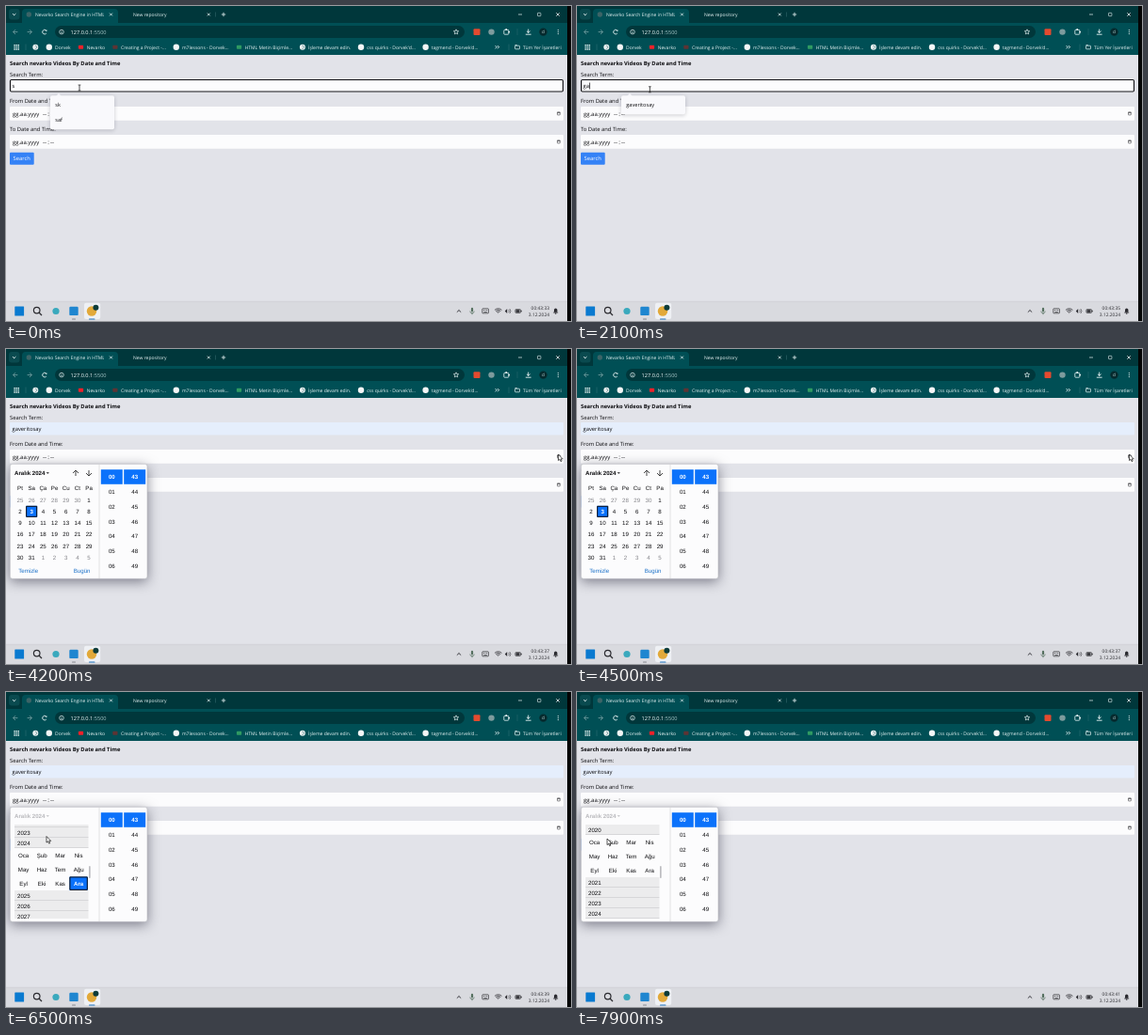
Recreate the animation shown at these times as an HTML page with a canvas. Size 600 by 335 pixels, loop 8000 ms.

```html
<!DOCTYPE html>
<html lang="tr">
<head>
<meta charset="utf-8">
<title>Search Videos</title>
<style>
html, body { margin: 0; width: 100%; height: 100%; overflow: hidden; background: #000; }
canvas { display: block; width: 600px; height: 335px; }
</style>
</head>
<body>
<canvas id="stage" width="600" height="335"></canvas>
<script>
const ctx = document.getElementById('stage').getContext('2d');
const UI = '"Open Sans", "Noto Sans", sans-serif';
const ARIAL = '"Liberation Sans", Arial, sans-serif';
const LOOP = 8000;
const TERM = 'gaveritosay';
const BLUE = '#0b72fb', INK = '#0c0c0f', PALE = '#e9f4f4', DIM = '#6f9a9d';
const STRIP = '#00373b', BAR = '#004f55', PAGE = '#e2e3e9', SHEET = '#fcfcfd';

const ramp = (t, a, b) => Math.min(1, Math.max(0, (t - a) / (b - a)));
const mix = (a, b, p) => a + (b - a) * p;
const glide = (t, a, b) => {
  const p = ramp(t, a, b);
  return p * p * (3 - 2 * p);
};

// ---- drawing helpers ----

function box(x, y, w, h, fill, r = 0) {
  ctx.fillStyle = fill;
  ctx.beginPath();
  ctx.roundRect(x, y, w, h, r);
  ctx.fill();
}

function frame(x, y, w, h, color, width = 1, r = 0) {
  ctx.strokeStyle = color;
  ctx.lineWidth = width;
  ctx.beginPath();
  ctx.roundRect(x, y, w, h, r);
  ctx.stroke();
}

function dot(x, y, r, fill) {
  ctx.fillStyle = fill;
  ctx.beginPath();
  ctx.arc(x, y, r, 0, 7);
  ctx.fill();
}

// An arc that spans the given angle, centred on a heading
function arc(x, y, r, color, width = 0.8, span = 2 * Math.PI, heading = 0) {
  ctx.strokeStyle = color;
  ctx.lineWidth = width;
  ctx.beginPath();
  ctx.arc(x, y, r, heading - span / 2, heading + span / 2);
  ctx.stroke();
}

function line(x0, y0, x1, y1, color, width = 0.8) {
  ctx.strokeStyle = color;
  ctx.lineWidth = width;
  ctx.beginPath();
  ctx.moveTo(x0, y0);
  ctx.lineTo(x1, y1);
  ctx.stroke();
}

// Runs a drawing around (x, y), turned clockwise by quarter turns
function turned(x, y, quarters, draw) {
  ctx.save();
  ctx.translate(x, y);
  ctx.rotate(quarters * Math.PI / 2);
  draw();
  ctx.restore();
}

const UP = 0, RIGHT = 1, DOWN = 2, LEFT = 3;

function chevron(x, y, r, dir, color, width = 0.9) {
  turned(x, y, dir, () => {
    line(-r, r / 2, 0.2, -r / 2, color, width);
    line(r, r / 2, -0.2, -r / 2, color, width);
  });
}

function arrow(x, y, r, dir, color) {
  turned(x, y, dir, () => line(0, r, 0, -r, color, 0.9));
  turned(x, y, dir, () => {
    line(-r, 0, 0, -r, color, 0.9);
    line(r, 0, 0, -r, color, 0.9);
  });
}

function triangle(x, y, r, dir, color) {
  turned(x, y, dir, () => {
    ctx.fillStyle = color;
    ctx.beginPath();
    ctx.moveTo(-r, r / 2);
    ctx.lineTo(r, r / 2);
    ctx.lineTo(0, -r / 2);
    ctx.fill();
  });
}

function cross(x, y, r, color) {
  line(x - r, y - r, x + r, y + r, color);
  line(x - r, y + r, x + r, y - r, color);
}

function star(x, y, r, color) {
  ctx.strokeStyle = color;
  ctx.lineWidth = 0.7;
  ctx.beginPath();
  for (let i = 0; i < 10; i++) {
    const a = Math.PI * i / 5, d = i % 2 ? r * 0.45 : r;
    ctx.lineTo(x + d * Math.sin(a), y - d * Math.cos(a));
  }
  ctx.closePath();
  ctx.stroke();
}

function globe(x, y) {
  dot(x, y, 3, '#eef4f4');
  arc(x, y, 1.5, '#47767a', 0.7, 4);
}

function shadowed(blur, color, draw) {
  ctx.save();
  ctx.shadowBlur = blur;
  ctx.shadowOffsetY = blur / 4;
  ctx.shadowColor = color;
  draw();
  ctx.restore();
}

function clipped(x, y, w, h, draw) {
  ctx.save();
  ctx.beginPath();
  ctx.rect(x, y, w, h);
  ctx.clip();
  draw();
  ctx.restore();
}

// y is the middle of the capital letters; returns the width
function text(s, x, y, size = 5.8, color = INK, align = 'left', family = UI, weight = 400) {
  ctx.font = `${weight} ${size}px ${family}`;
  ctx.textAlign = align;
  ctx.fillStyle = color;
  ctx.fillText(s, x, y + size * 0.36);
  return ctx.measureText(s).width;
}
const cal = (s, x, y, color = INK, align = 'center', weight = 400) =>
  text(s, x, y, 6.15, color, align, ARIAL, weight);

// ---- browser ----

function tabStrip() {
  const y = 9;
  box(0, 0, 597, 19, STRIP);
  box(3, 3, 11.5, 11.5, '#0a4a4f', 3);
  chevron(8.7, y, 1.7, DOWN, PALE);
  box(17, 3, 102, 18, BAR, [4, 4, 0, 0]);
  dot(24.3, y, 2.7, '#3c6467');
  clipped(30, 2, 74, 16, () => text('Nevarko Search Engine in HTML', 31, y, 5, PALE));
  text('New repository', 135, y, 5, PALE);
  for (const x of [111.5, 215.3]) cross(x, y, 1.4, PALE);
  line(222.5, 6.5, 222.5, 11.5, '#3d7276', 0.5);
  line(228.8, y, 233.2, y, PALE);
  line(231, 6.8, 231, 11.2, PALE);
  line(544, y, 548, y, PALE, 0.7);
  frame(564.5, 7.3, 3.4, 3.4, PALE, 0.6, 0.6);
  cross(586, y, 1.7, PALE);
}

function toolbar() {
  const y = 27.6;
  box(0, 18, 597, 34, BAR);
  arrow(10, y, 2.4, LEFT, DIM);
  arrow(25, y, 2.4, RIGHT, DIM);
  arc(41, y, 2.3, PALE, 0.9, 5, Math.PI);
  triangle(42.8, y - 1.3, 1.3, DOWN, PALE);
  box(52, 21, 435, 13, STRIP, 6.5);
  arc(59, y, 2.3, PALE, 0.7);
  line(59, y - 0.4, 59, y + 1.3, PALE);
  const w = text('127.0.0.1', 68.6, y, 5.6, '#f6fafa');
  text(':5500', 68.6 + w, y, 5.6, '#a3c3c5');

  star(478, y, 2.8, PALE);
  box(496.5, 24.3, 7, 6.6, '#e34a2f', 1);
  dot(515.5, y, 3.2, '#7d9b9d');
  frame(528.8, 25.4, 5, 4.8, PALE, 0.8, 0.7);
  dot(531.2, 25, 0.9, PALE);
  dot(534.2, y, 0.9, PALE);
  line(543, 24, 543, 31, '#2d6c70', 0.5);
  line(554.7, 24.6, 554.7, y + 0.8, PALE, 0.9);
  chevron(554.7, y, 1.8, DOWN, PALE);
  line(551.8, y + 2.6, 557.6, y + 2.6, PALE, 0.9);
  dot(570.5, y, 4.2, '#062a2e');
  text('d', 570.5, y, 4.6, '#c3dada', 'center');
  for (let i = -1; i < 2; i++) dot(586.3, y + i * 2, 0.6, PALE);
}

const BOOKMARKS = [
  ['Dorvek', 'white'], ['Nevarko', '#f0212a'], ['Creating a Project -...', '#5d3434'],
  ['m7lessons - Dorvek...', 'white'], ['HTML Metin Biçimle...', '#2f9a62'],
  ['İşleme devam edin.', null], ["css quirks - Dorvek'd...", 'white'],
  ["tagmend - Dorvek'd...", 'white']
];

function bookmarks() {
  const y = 43.7;
  for (let i = 0; i < 9; i++)
    box(8.4 + (i % 3) * 2.1, 41.1 + Math.floor(i / 3) * 2.1, 1.4, 1.4, PALE);
  for (const x of [21, 534]) line(x, 40.5, x, 47, '#35747a', 0.5);
  globe(31.3, y);
  let x = 52;
  for (const [name, color] of BOOKMARKS) {
    if (!color) globe(x - 6.2, y);
    else if (color === 'white') dot(x - 6.2, y, 3.2, '#f4f6f6');
    else box(x - 8.7, y - 2, 5.2, 4, color, 0.8);
    x += text(name, x, y, 5, PALE) + 17;
  }
  for (const dx of [0, 2.4]) chevron(520.4 + dx, y, 1.7, RIGHT, PALE, 0.8);
  frame(540.5, 42.2, 5, 3.6, PALE, 0.7, 0.6);
  line(540.5, 41.6, 542.7, 41.6, PALE);
  text('Tüm Yer İşaretleri', 549, y, 5, PALE);
}

// ---- page ----

function dateField(y) {
  box(4, y - 7.4, 588, 14.6, SHEET, 1);
  text('gg.aa.yyyy', 7, y, 5.95);
  for (const x of [39, 46.9]) text('--', x, y, 6.3);
  text(':', 44.2, y, 6.3);
  frame(585.5, y - 1.4, 2.8, 2.8, '#3a3a3e', 0.6, 0.3);
  line(585.3, y - 1.3, 588.5, y - 1.3, '#3a3a3e');
}

function page(t) {
  box(0, 52, 597, 262, PAGE);
  text('Search nevarko Videos By Date and Time', 4, 60.7, 5.8, INK, 'left', UI, 700);
  text('Search Term:', 4, 73.3);
  ['From', 'To'].forEach((word, i) => {
    const y = 114.5 + i * 30;
    text(word + ' Date and Time:', 4, y - 14);
    dateField(y);
  });
  box(4, 155.7, 25.7, 13, '#3482f6', 1);
  text('Search', 7.6, 162.3, 5.8, '#fff');

  const filled = t >= 2300, focused = t < 4000;
  box(4, 78, 588, 13.4, filled ? '#e5eefc' : SHEET, 1);
  if (focused) frame(4.5, 78.5, 587, 12.5, '#101014', 1.1, 1.2);
  const value = filled ? TERM : t < 100 ? 's' : t < 900 ? '' : 'ga'.slice(0, t < 1500 ? 1 : 2);
  const w = text(value, 6.5, 85.2);
  if (t >= 100 && !filled && (t < 600 || t >= 900)) box(6.7 + w, 81.5, 0.7, 7, INK);
}

function suggestions(items, alpha, hovered) {
  ctx.globalAlpha = alpha;
  shadowed(4, 'rgba(30,30,50,.22)', () => box(47, 95.3, 68, 4 + items.length * 16, '#f9f9fc', 2));
  triangle(56, 94.3, 2.8, UP, '#f9f9fc');
  if (hovered) box(47, 97.3, 68, 16, '#e6e7ec');
  items.forEach((s, i) => text(s, 52.3, 105.3 + i * 16, 5.6));
  ctx.globalAlpha = 1;
}

// ---- date picker ----

function marked(label, x, y, w, h) {
  box(x - w / 2, y - h / 2, w, h, BLUE);
  frame(x - w / 2 + 0.5, y - h / 2 + 0.5, w - 1, h - 1, INK, 1);
  cal(label, x, y, '#fff', 'center', 700);
}

function dayGrid() {
  arrow(74, 132, 3, UP, '#333');
  arrow(88, 132, 3, DOWN, '#333');
  const colX = i => 15 + i * 12.18;
  ['Pt', 'Sa', 'Ça', 'Pe', 'Cu', 'Ct', 'Pa'].forEach((d, i) => cal(d, colX(i), 148.2));
  for (let i = 0; i < 42; i++) {
    const n = i - 5, x = colX(i % 7), y = 160.6 + Math.floor(i / 7) * 12.2;
    if (n === 3) marked(n, x, y, 12, 12);
    else if (n < 1) cal(n + 30, x, y, '#85858a');
    else cal((n - 1) % 31 + 1, x, y, n > 31 ? '#85858a' : INK);
  }
  cal('Temizle', 13.3, 236, '#1a70c8', 'left');
  cal('Bugün', 80.6, 236, '#1a70c8');
}

const MONTHS = ['Oca', 'Şub', 'Mar', 'Nis', 'May', 'Haz', 'Tem', 'Ağu', 'Eyl', 'Eki', 'Kas', 'Ara'];

function monthGrid(top, height, current) {
  clipped(9, top, 78.5, height, () => {
    box(9, top, 78.5, height, SHEET);
    MONTHS.forEach((m, i) => {
      const x = 18.6 + (i % 4) * 19.5, y = top + 8 + Math.floor(i / 4) * 14.8;
      if (i === current) marked(m, x, y, 19.4, 14.4);
      else cal(m, x, y);
    });
  });
}

function yearList(t) {
  const swap = glide(t, 7400, 7800);
  const open = { 2020: 45 * swap, 2024: 45 * (1 - swap) };
  const scroll = 97 + 14 * glide(t, 6150, 6400) + 42 * glide(t, 6900, 7300) - 12 * swap;
  clipped(9, 141, 79, 100, () => {
    let y = scroll - 44;
    for (let year = 2016; year < 2034; year++) {
      box(9, y, 78.5, 11, '#ececed');
      box(9, y + 10.4, 78.5, 0.6, '#c3c3c6');
      cal(year, 12, y + 5.7, INK, 'left');
      y += 11;
      if (open[year]) monthGrid(y, open[year], year === 2024 ? 11 : -1);
      y += open[year] || 0;
    }
  });
  box(88, 185, 1.7, 13, '#bdbdc1', 0.8);
}

function picker(t) {
  const alpha = ramp(t, 3900, 4200), listing = t >= 5900;
  const tone = listing ? '#b8b8bc' : INK;
  ctx.globalAlpha = alpha;
  shadowed(13, 'rgba(20,20,40,.5)', () => box(4.3, 122.3, 145.7, 122, SHEET, 2.5));
  frame(4.3, 122.3, 145.7, 122, '#b9bac0', 0.6, 2.5);
  line(99, 122.5, 99, 244, '#d0d0d4', 0.6);
  cal('Aralık 2024', 9, 132, tone, 'left', 700);
  triangle(44.3, 132, 1.6, DOWN, tone);
  if (listing) yearList(t);
  else dayGrid();

  [[112.3, 0], [136.7, 43]].forEach(([x, first]) => {
    box(x - 11.5, 128.2, 23, 15.6, BLUE);
    for (let i = 0; i < 7; i++) {
      const label = String(first + i).padStart(2, '0');
      cal(label, x, 136.2 + i * 15.7, i ? INK : '#fff', 'center', i ? 400 : 700);
    }
  });
  ctx.globalAlpha = 1;
}

// ---- taskbar ----

function taskbar(t) {
  const y = 324.5, ink = '#2b2b30';
  box(0, 314, 597, 21, '#d9dadf');
  line(0, 314.2, 597, 314.2, '#c6c7cc', 0.5);
  box(9.3, 319.6, 9.8, 9.8, '#0a7ad0', 0.5);
  arc(32.7, 323.6, 3.3, ink, 1.2);
  line(35, 326, 38, 329, ink, 1.3);
  dot(53, y, 3.6, '#3aa9bd');
  box(67.3, 319.7, 9.4, 9.4, '#1f86d0', 1.2);
  box(70, 332.5, 4, 1, '#83868d', 0.5);
  box(83, 315.7, 17.2, 17.2, '#eef0f4', 2);
  dot(91, y, 5.2, '#e2a93a');
  dot(95.4, 320.8, 3, '#0c3c3a');
  box(88, 332.5, 6.5, 1, '#1b72c0', 0.5);

  chevron(481, y, 2.2, UP, ink);
  box(493.9, 320.8, 2.2, 4.6, '#55705f', 1.1);
  arc(495, y, 2.2, '#55705f', 0.7, Math.PI, Math.PI / 2);
  line(495, 326.6, 495, 328.2, '#55705f');
  frame(505.8, 321.8, 6.6, 5, ink, 0.7, 0.6);
  for (let i = 0; i < 3; i++) box(507.1 + i * 1.6, 323.2, 0.8, 0.8, ink);
  line(507.4, 325.5, 510.8, 325.5, ink, 0.7);
  for (let i = 0; i < 4; i++) arc(522.7, 327, 0.4 + i * 1.6, ink, 0.8, 1.6, -Math.PI / 2);
  triangle(531, y, 2.4, LEFT, ink);
  for (const r of [1.8, 3.4]) arc(532.4, y, r, ink, 0.6, 1.6);
  frame(540.9, 322.6, 5.6, 3.8, ink, 0.7, 0.7);
  box(541.5, 323.2, 4, 2.6, ink);
  box(546.9, 323.7, 0.8, 1.6, ink);

  text('00:43:' + (33 + Math.floor((t + 400) / 1000)), 577, 321, 4.9, ink, 'right');
  text('3.12.2024', 577, 328, 4.9, ink, 'right');
  box(582, 321.6, 3.4, 4.2, ink, [1.7, 1.7, 0, 0]);
  line(581.2, 326, 586.2, 326, ink);
  dot(583.7, 327, 0.8, ink);
}

// ---- pointer ----

// Each move: start, end, goal x, goal y
const MOVES = [
  [2050, 2300, 72, 104], [2500, 3200, 517, 89], [3200, 3700, 586.5, 112],
  [4600, 5300, 50, 136], [5500, 5800, 42, 131], [6000, 6400, 43, 153.5],
  [7000, 7400, 32, 156]
];

function pointer(t) {
  let x = 78, y = 87;
  for (const [a, b, gx, gy] of MOVES) {
    const p = glide(t, a, b);
    x = mix(x, gx, p);
    y = mix(y, gy, p);
  }
  const overText = t < 2200 || (t > 2500 && t < 3600);
  if (overText) {
    line(x, y - 3, x, y + 3, '#222');
    for (const dy of [-3, 3]) line(x - 1.4, y + dy, x + 1.4, y + dy, '#222', 0.7);
    return;
  }
  const body = new Path2D(`M${x} ${y}v6.6l1.5-1.3l1.2 2.4l1-.5l-1-2.3h2z`);
  ctx.fillStyle = '#fff';
  ctx.fill(body);
  ctx.strokeStyle = '#111';
  ctx.lineWidth = 0.7;
  ctx.stroke(body);
}

function draw(t) {
  tabStrip();
  toolbar();
  bookmarks();
  page(t);
  if (t < 400) suggestions(['sk', 'saf'], 1 - ramp(t, 0, 400), false);
  if (t >= 2000 && t < 2500) suggestions([TERM], 1 - ramp(t, 2200, 2500), t >= 2200);
  if (t > 3900) picker(t);
  taskbar(t);
  pointer(t);
  box(596, 0, 4, 335, '#030404');
}

ctx.textRendering = 'geometricPrecision';
const start = performance.now();
function tick() {
  const t = (performance.now() - start) % LOOP;
  draw(Math.floor(t / 100) * 100);
  requestAnimationFrame(tick);
}
tick();
</script>
</body>
</html>
```
